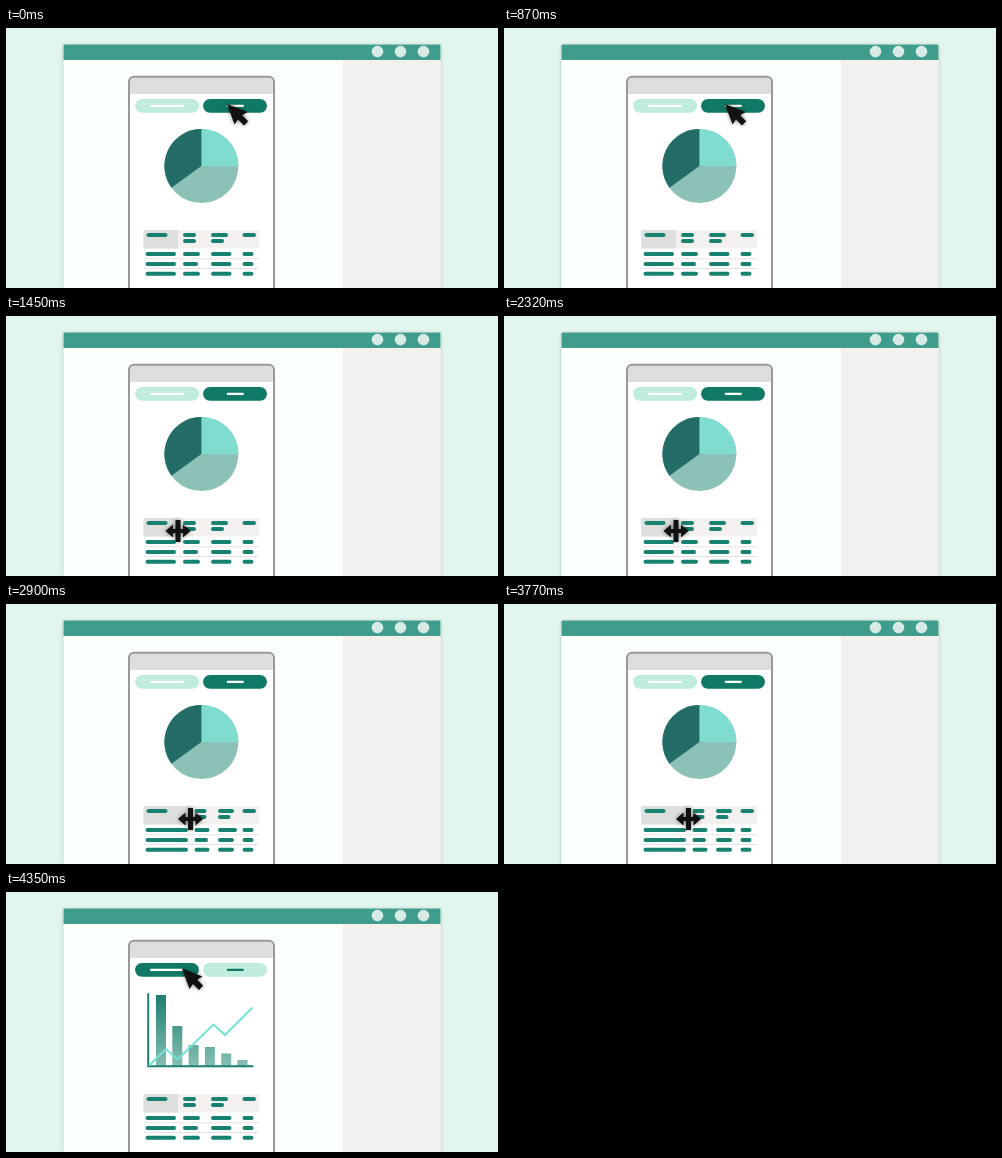
Recreate the animation shown at these times as an HTML page. Size 492 by 260 pixels, loop 5800 ms.

```html
<!DOCTYPE html>
<html lang="en">
<head>
<meta charset="utf-8">
<title>Report editor</title>
<style>
  html, body { margin: 0; height: 100%; overflow: hidden; background: #e2f6ee; }
  svg { display: block; width: 100vw; height: 100vh; }
  .dash { stroke: #178270; stroke-width: 4; stroke-linecap: round; }
  .cursor { fill: #111; filter: drop-shadow(0 0.5px 2px #0007); }
</style>
</head>
<body>
<svg viewBox="0 0 492 260">
  <defs>
    <linearGradient id="fade" gradientUnits="userSpaceOnUse" x1="0" y1="103" x2="0" y2="174">
      <stop stop-color="#1b7f6d"/><stop offset="1" stop-color="#86bfb3"/>
    </linearGradient>
  </defs>

  <!-- window -->
  <g style="filter: drop-shadow(0 1px 2px #0003)">
    <path d="M57.5 260V17.5q0-1 1-1H433.500q1 0 1 1V260z" fill="#fafefd"/>
  </g>
  <path d="M337 32H434.500V260H337z" fill="#f3f1f0"/>
  <path d="M57.5 32V17.500q0-1 1-1H433.500q1 0 1 1V32z" fill="#409d8b"/>
  <g fill="#d6ebe5" stroke="#e6f4f0">
    <circle cx="371.5" cy="23.5" r="5.3"/>
    <circle cx="394.5" cy="23.5" r="5.3"/>
    <circle cx="417.5" cy="23.5" r="5.3"/>
  </g>

  <!-- phone -->
  <rect x="123" y="48.700" width="145" height="240" rx="5" fill="#fff"/>
  <path d="M123 66V53.700q0-5 5-5H263q5 0 5 5V66z" fill="#dededd"/>
  <rect x="123" y="48.700" width="145" height="240" rx="5" fill="none" stroke="#999" stroke-width="2"/>
  <rect id="leftTab" x="129" y="71" width="64" height="13.700" rx="6.85"/>
  <rect id="rightTab" x="197" y="71" width="64" height="13.700" rx="6.85"/>
  <g stroke-width="2.2" stroke-linecap="round">
    <path d="M145 77.900H177" stroke="#fff"/>
    <path id="rightLabel" d="M221.800 77.900H236.800"/>
  </g>

  <g id="pie">
    <circle cx="195.4" cy="138" r="37" fill="#8bc1b6"/>
    <path d="M195.400 138V101A37 37 0 0 1 232.400 138z" fill="#7eddcf"/>
    <path d="M195.400 138V101A37 37 0 0 0 165.400 159.700z" fill="#236c68"/>
  </g>

  <g id="chart" fill="none" stroke-width="2">
    <g id="bars" fill="url(#fade)"></g>
    <path d="M142.200 102V174.300H246.500" stroke="#1a806f" stroke-linecap="round"/>
    <path d="M143 173.500L160 157L171.500 167.500L207.500 132.500L219 143L246.500 115.500" stroke="#72e3d5"/>
  </g>

  <g id="table"></g>

  <path id="arrow" class="cursor" d="M0 0L20.500 8L15.200 11.300L21.200 17.300L17 21.500L11 15.500L7.500 20.500z"/>
  <path id="resize" class="cursor" d="M-2.500-11H2.500V-2H5V-6.500L12.500 0L5 6.500V2H2.500V11H-2.500V2H-5V6.500L-12.500 0L-5-6.500V-2H-2.500z"/>
</svg>
<script>
const $ = id => document.getElementById(id);
const DARK = '#107965', LIGHT = '#bfecdc', STEP = 1450;

const box = (x, y, w, h, fill = '') =>
  `<rect x="${x}" y="${y}" width="${w}" height="${h}" ${fill && `fill="${fill}"`}/>`;
const dash = (x1, x2, y) => `<path class="dash" d="M${x1 + 2} ${y}H${x2 - 2}"/>`;

$('bars').innerHTML = [103, 134, 153, 155, 161.5, 168]
  .map((y, i) => box(150 + i * 16.3, y, 10, 174 - y)).join('');

function table(wide) {
  const a = wide ? 188.5 : 177, b = wide ? 212 : 205;
  const ends = wide
    ? [[203.5, 231], [202, 228], [203.5, 228]]
    : [[194, 225.5], [192, 225.5], [194, 225.5]];
  let out = box(137.5, 202, 115.5, 18.5, '#f3f1f0')
    + box(137.5, 202, wide ? 47 : 34.5, 18.5, '#dededd')
    + box(137.5, 230.4, 115.5, 0.8, '#ddd') + box(137.5, 240.2, 115.5, 0.8, '#ddd')
    + dash(140.5, 161.5, 206.900) + dash(236.5, 250, 206.900)
    + dash(a, a + (wide ? 12 : 13), 206.900) + dash(a, a + (wide ? 12 : 13), 212.900)
    + dash(b, b + (wide ? 16 : 17), 206.900) + dash(b, b + (wide ? 12.5 : 13), 212.900);
  ends.forEach(([endA, endB], i) => {
    const y = 226 + i * 9.9;
    out += dash(139.5, wide ? 182 : 170, y) + dash(a, endA, y)
      + dash(b, endB, y) + dash(236.5, 247.5, y);
  });
  return out;
}

const scenes = [
  { cursor: 'arrow', x: 221, y: 76 },
  { cursor: 'resize', x: 172, y: 215 },
  { cursor: 'resize', x: 184.5, y: 215, wide: true },
  { cursor: 'arrow', x: 176, y: 76.5, chart: true },
];

const show = (id, on) => $(id).setAttribute('visibility', on ? 'visible' : 'hidden');

function draw({ cursor, x, y, wide, chart }) {
  show('chart', chart);
  show('pie', !chart);
  $('leftTab').setAttribute('fill', chart ? DARK : LIGHT);
  $('rightTab').setAttribute('fill', chart ? LIGHT : DARK);
  $('rightLabel').setAttribute('stroke', chart ? DARK : '#fff');
  $('table').innerHTML = table(wide);
  for (const id of ['arrow', 'resize']) show(id, id === cursor);
  $(cursor).setAttribute('transform', `translate(${x} ${y})`);
}

let current = -1;
function tick() {
  const i = Math.floor(performance.now() / STEP) % scenes.length;
  if (i !== current) draw(scenes[current = i]);
  requestAnimationFrame(tick);
}
tick();
</script>
</body>
</html>
```
